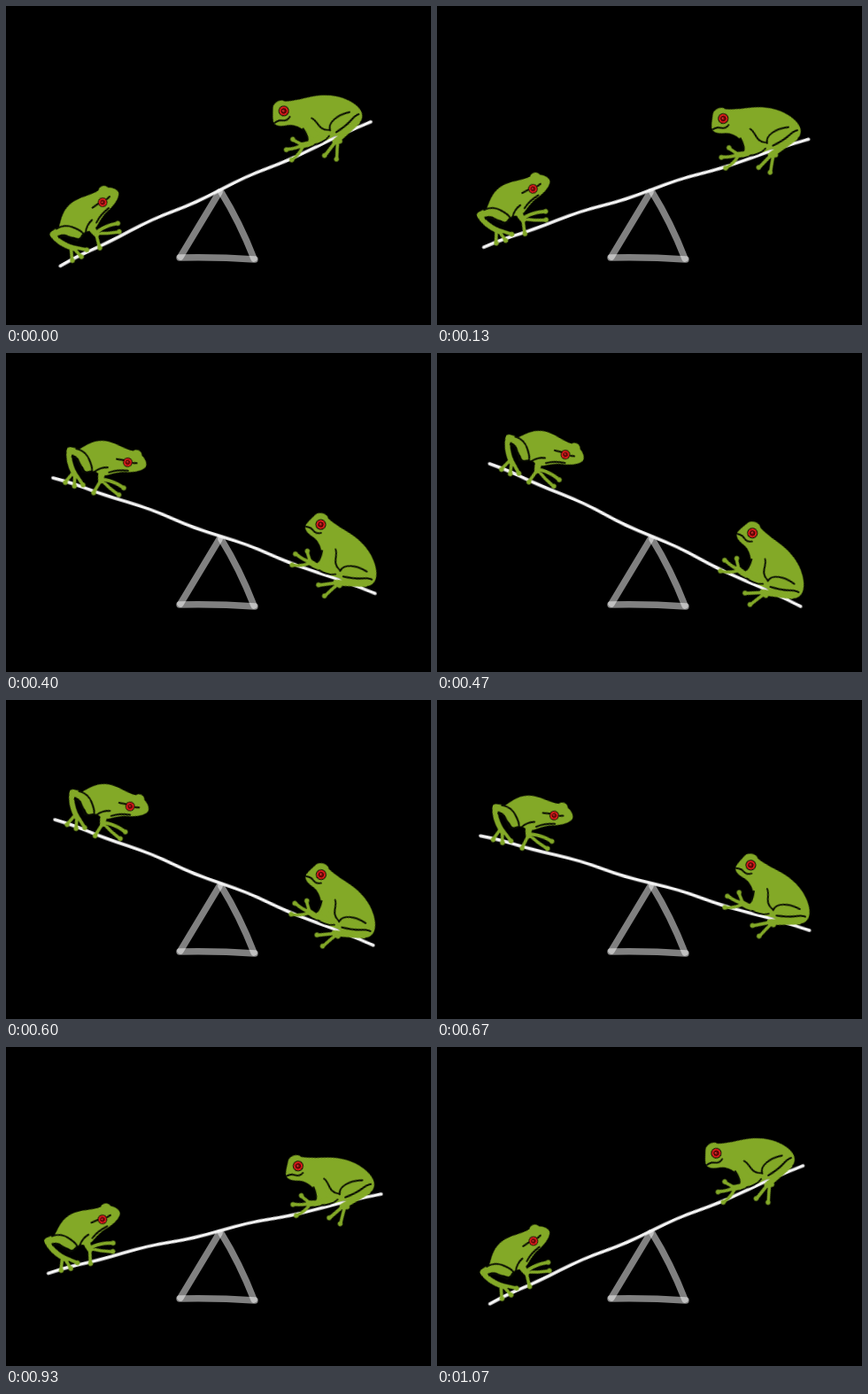
Write an HTML page without scripts that moves like this. It is 480 by 360 pixels and loops after 1190 ms.

```html
<!DOCTYPE html>
<html lang="en">
<head>
<meta charset="utf-8">
<title>Frogs on a seesaw</title>
<style>
html, body { margin: 0; width: 100%; height: 100%; overflow: hidden; background: #000; }
svg { display: block; width: 100vw; height: 100vh; }
path { fill: none; stroke-linecap: round; stroke-linejoin: round; }
.skin { fill: #83a927; }
.limb { stroke: #83a927; stroke-width: 8; }
.toe { stroke: #83a927; stroke-width: 3.6; }
.tip { stroke: #83a927; stroke-width: 5.4; }
.ink { stroke: #070a02; stroke-width: 1.9; }
.stand { stroke: #fff; stroke-opacity: .5; stroke-width: 7.5; }
.plank { stroke: #f6f6f6; stroke-width: 3.6; }
.tilt { transform-origin: 243px 207px; animation: tilt 1190ms step-end infinite; }
@keyframes tilt {
  0% { transform: rotate(-28deg); }
  5.87% { transform: rotate(-26.2deg); }
  10.91% { transform: rotate(-21.5deg); }
  16.79% { transform: rotate(-11.5deg); }
  22.67% { transform: rotate(0deg); }
  27.72% { transform: rotate(9.2deg); }
  33.6% { transform: rotate(16.6deg); }
  39.48% { transform: rotate(21.5deg); }
  44.52% { transform: rotate(21.9deg); }
  50.4% { transform: rotate(18.4deg); }
  56.29% { transform: rotate(12.9deg); }
  61.33% { transform: rotate(7.4deg); }
  67.21% { transform: rotate(.75deg); }
  73.1% { transform: rotate(-8.2deg); }
  78.14% { transform: rotate(-16.5deg); }
  84.02% { transform: rotate(-23.2deg); }
  89.9% { transform: rotate(-26.9deg); }
}
</style>
</head>
<body>
<svg viewBox="0 0 480 360">
  <defs>
    <g id="eye">
      <circle r="6" fill="#070a02"/>
      <circle r="5" fill="#e81c1c"/>
      <circle r="2.5" fill="#8e0c0c" stroke="#2a0303" stroke-width="1.1"/>
      <circle cx="-.6" cy="-.5" r=".9" fill="#e84a40"/>
    </g>
  </defs>
  <rect width="480" height="360" fill="#000"/>

  <g class="stand">
    <path d="M241 210L197 283"/>
    <path d="M243 210Q264 244 280 285"/>
    <path d="M196 284Q238 283 281 286"/>
  </g>

  <g class="tilt">
    <path class="plank" d="M42 198Q60 197 80 198.5T130 200T185 203.500T243 207T300 210.500T360 215T428 219"/>

    <g id="left">
      <path class="skin" d="M60 160C68 151 76 142 88 141C100 140 111 144 120 143C123 139 130 140 131 145C137 148 141 154 138 158C134 163 127 166 120 168C111 170 106 174 99 178L91 180C88 176 83 177 78 179C70 178 63 171 60 160Z"/>
      <path class="limb" d="M52 163Q60 161 66 166T76 176"/>
      <path class="limb" style="stroke-width:6" d="M51 163Q52 174 64 187"/>
      <path class="limb" style="stroke-width:7" d="M98 171Q91 177 95 185"/>
      <path class="toe" d="M63 184L57 198M64 185L68 200M65 186L77 196M95 184L91 200M95 184Q107 181 122 186M96 185Q106 191 118 195"/>
      <path class="tip" d="M57 199h0M68 200h0M77 196h0M91 201h0M122 186h0M119 195h0"/>
      <path class="ink" d="M58 159Q68 158 75 166T82 178Q79 182 73 181M56 169Q61 168 66 174T72 182M85 178Q90 171 98 169M101 174Q109 168 121 166M105 157L113 156M124 156L128 155"/>
      <use href="#eye" transform="translate(118 157) scale(.9)"/>
    </g>

    <g id="right">
      <path class="skin" d="M331 167C333 161 336 157 338 153C341 148 351 148 353 153C363 158 375 160 387 164C401 169 412 178 418 187C424 196 427 206 420 212C411 218 395 217 384 214C376 214 363 214 357 209C354 205 358 198 357 192C354 185 349 180 343 178C336 176 330 173 331 167Z"/>
      <path class="limb" d="M364 190Q362 201 370 206"/>
      <path class="limb" style="stroke-width:6.500" d="M368 208Q357 210 347 206"/>
      <path class="limb" style="stroke-width:6.500" d="M414 212Q398 216 382 220"/>
      <path class="toe" d="M348 206L341 196M348 206Q339 206 330 202M348 207Q341 213 330 215M390 217Q378 222 365 228M386 219Q380 228 375 237M392 216L387 221"/>
      <path class="tip" d="M341 195h0M329 202h0M329 215h0M364 228h0M374 238h0M387 222h0"/>
      <path class="ink" d="M332 169Q337 168 341 171T350 171M371 184C376 190 371 200 382 205M383 206C384 197 399 194 412 198M388 211Q401 210 409 207T420 205M357 190Q358 198 356 203M379 211Q371 215 360 212"/>
      <use href="#eye" transform="translate(347 162)"/>
    </g>
  </g>
</svg>
</body>
</html>
```
